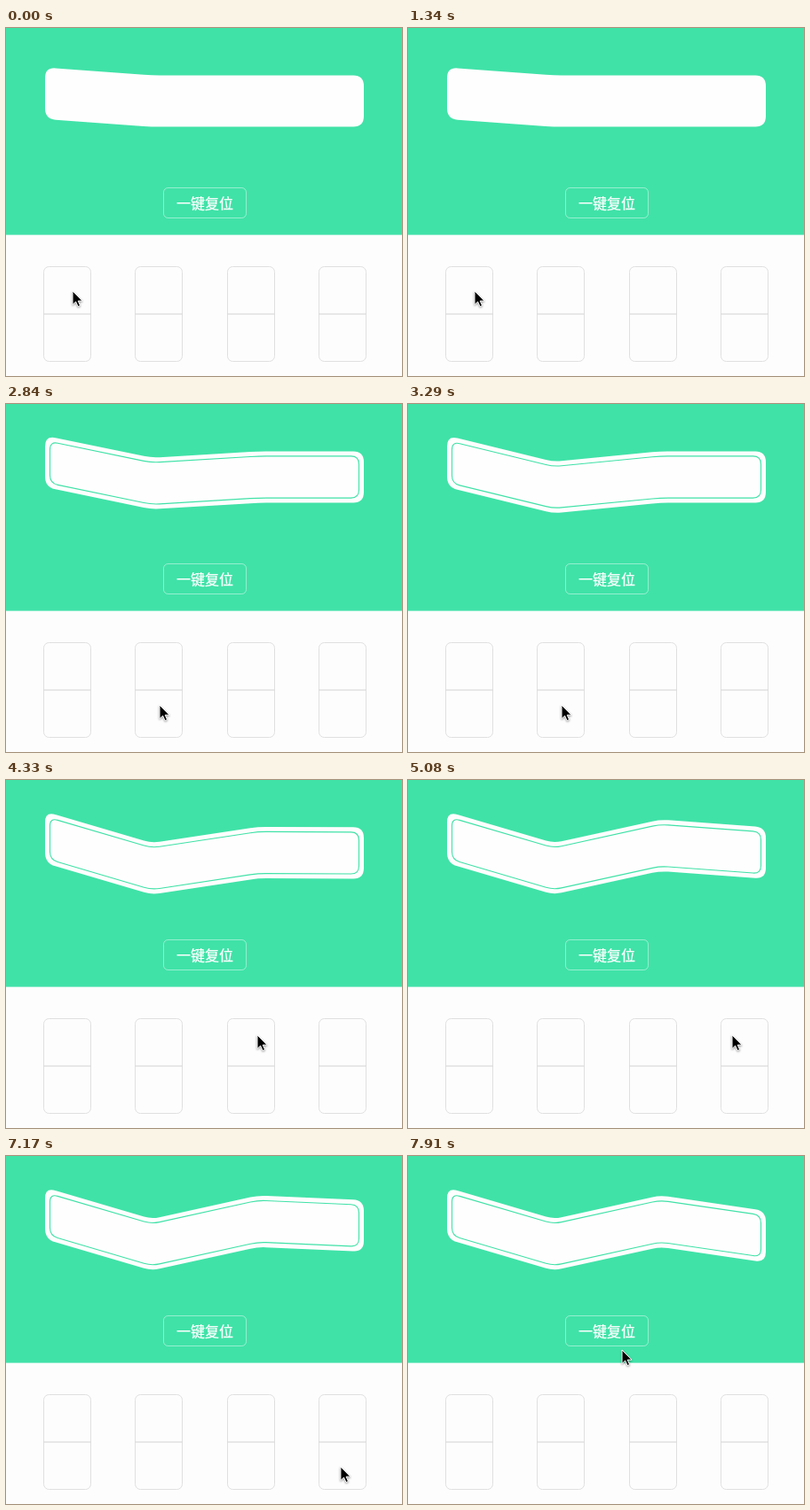
Write an HTML page that moves like this. It is 446 by 393 pixels and loops after 8000 ms.

```html
<!DOCTYPE html>
<html lang="zh">
<head>
<meta charset="utf-8">
<style>
html, body { margin: 0; width: 100%; height: 100%; overflow: hidden; background: #fdfdfd; }
svg { display: block; }
text { font: 16px "Noto Sans CJK SC", "Noto Sans CJK", "Noto Sans CJK JP", sans-serif; text-anchor: middle; fill: #fff; stroke: #fff; stroke-width: .25; }
#cursor { filter: drop-shadow(0 1px 1px #0006); }
</style>
</head>
<body>
<svg id="stage" width="446" height="393" viewBox="0 0 446 393">
  <rect width="446" height="233.6" fill="#40e2a8"/>
  <path id="band" fill="#fefefe"/>
  <path id="line" fill="none" stroke="#40e2a8" stroke-width="1.1"/>
  <rect x="177.5" y="180.5" width="93" height="34" rx="5" fill="none" stroke="#fff" stroke-opacity=".45"/>
  <text x="224" y="204">一键复位</text>
  <g id="pads"></g>
  <path id="cursor" d="M0 0V15.5L3.6 12.1L6.1 17.6L8.6 16.5L6.2 11.2H11Z" fill="#000" stroke="#fff"/>
</svg>
<script>
const LOOP = 8000, TICK = 149.2, PRESS = 140;
const STEP = 8.85, DELAY = 80, GLIDE = 1000;
const TRAVEL = 600, PITCH = 103.3;
const KNOTS = [44, 164, 284, 403];

// arrival time, x, y
const STOPS = [
  [0, 75, 297], [600, 172, 327], [1040, 75, 297], [2230, 173, 340], [3880, 283, 288],
  [5070, 365, 288], [6115, 377, 351], [7750, 279, 290], [7900, 241, 219]
];
const CLICK_TIMES = [1335, 2235, 2980, 4170, 5215, 6710, 7010];

const $ = id => document.getElementById(id);
const mix = (a, b, k) => a + (b - a) * k;
const bez = (a, b, u) => 3 * (1 - u) * (1 - u) * u * a + 3 * (1 - u) * u * u * b + u ** 3;

// the CSS "ease" curve
function ease(x) {
  if (x <= 0) return 0;
  if (x >= 1) return 1;
  let lo = 0, hi = 1;
  for (let i = 0; i < 20; i++) {
    const m = (lo + hi) / 2;
    if (bez(.25, .25, m) < x) lo = m; else hi = m;
  }
  return bez(.1, 1, lo);
}

function mouseAt(t) {
  const i = STOPS.findIndex(s => s[0] > t);
  if (i < 0) return STOPS.at(-1).slice(1);
  const [t0, x0, y0] = STOPS[i - 1], [t1, x1, y1] = STOPS[i];
  const start = Math.max(t0, t1 - TRAVEL);
  const u = Math.max(0, (t - start) / (t1 - start)), k = u * u * (3 - 2 * u);
  return [mix(x0, x1, k), mix(y0, y1, k)];
}

// the half of the pad under the pointer decides the direction
const clicks = CLICK_TIMES.map(time => {
  const [x, y] = mouseAt(time);
  return { time, pad: Math.floor((x - 42) / PITCH), half: y > 323 ? 1 : 0 };
});

function offset(pad, t) {
  let from = pad ? 0 : -1, to = from, at = -GLIDE;
  const now = time => mix(from, to, ease((time - at) / GLIDE));
  for (const c of clicks) {
    const begin = c.time + DELAY;
    if (c.pad !== pad || begin > t) continue;
    from = now(begin);
    to += c.half ? 1 : -1;
    at = begin;
  }
  return now(t) * STEP;
}

// closed path through [x, y, rounding] corners
function roundPath(pts) {
  const n = pts.length;
  const toward = ([x, y, r], [u, v]) => {
    const k = r / Math.hypot(u - x, v - y);
    return mix(x, u, k).toFixed(2) + " " + mix(y, v, k).toFixed(2);
  };
  return pts.map((p, i) =>
    (i ? "L" : "M") + toward(p, pts[(i + n - 1) % n]) +
    `Q${p[0]} ${p[1]} ` + toward(p, pts[(i + 1) % n])).join("") + "Z";
}

function ribbon(ys, inset, r) {
  const k = inset / 120;
  const mid = KNOTS.map((x, i) => {
    if (i === 0) return [x + inset, mix(ys[0], ys[1], k), r];
    if (i === 3) return [x - inset, mix(ys[3], ys[2], k), r];
    return [x, ys[i], 9];
  });
  const shift = dy => mid.map(([x, y, d]) => [x, y + dy, d]);
  return roundPath([...shift(53.4 + inset), ...shift(111.6 - inset).reverse()]);
}

$("pads").innerHTML = KNOTS.map((_, i) => `
  <g transform="translate(${42.5 + Math.round(i * PITCH)} 269.5)">
    <path d="M0 53V6Q0 0 6 0H47Q53 0 53 6V53Z" fill="none"/>
    <path d="M0 53V101Q0 107 6 107H47Q53 107 53 101V53Z" fill="none"/>
    <rect width="53" height="107" rx="6" fill="none" stroke="#e0e0e0"/>
    <path d="M0 53.5H53" stroke="#d2d2d2"/>
  </g>`).join("");
const pads = [...$("pads").children];

function draw(ms) {
  const t = Math.floor((ms % LOOP) / TICK) * TICK;
  const ys = KNOTS.map((_, i) => offset(i, t));
  $("band").setAttribute("d", ribbon(ys, 0, 12));
  $("line").setAttribute("d", t > clicks[0].time ? ribbon(ys, 5.5, 9) : "");
  pads.forEach((group, pad) => [0, 1].forEach(half => {
    const down = clicks.some(c => c.pad === pad && c.half === half && t >= c.time && t < c.time + PRESS);
    group.children[half].setAttribute("fill", down ? "#ececec" : "none");
  }));
  $("cursor").setAttribute("transform", `translate(${mouseAt(t)})`);
}

const begin = performance.now();
function loop() {
  draw(performance.now() - begin);
  requestAnimationFrame(loop);
}
loop();
</script>
</body>
</html>
```
